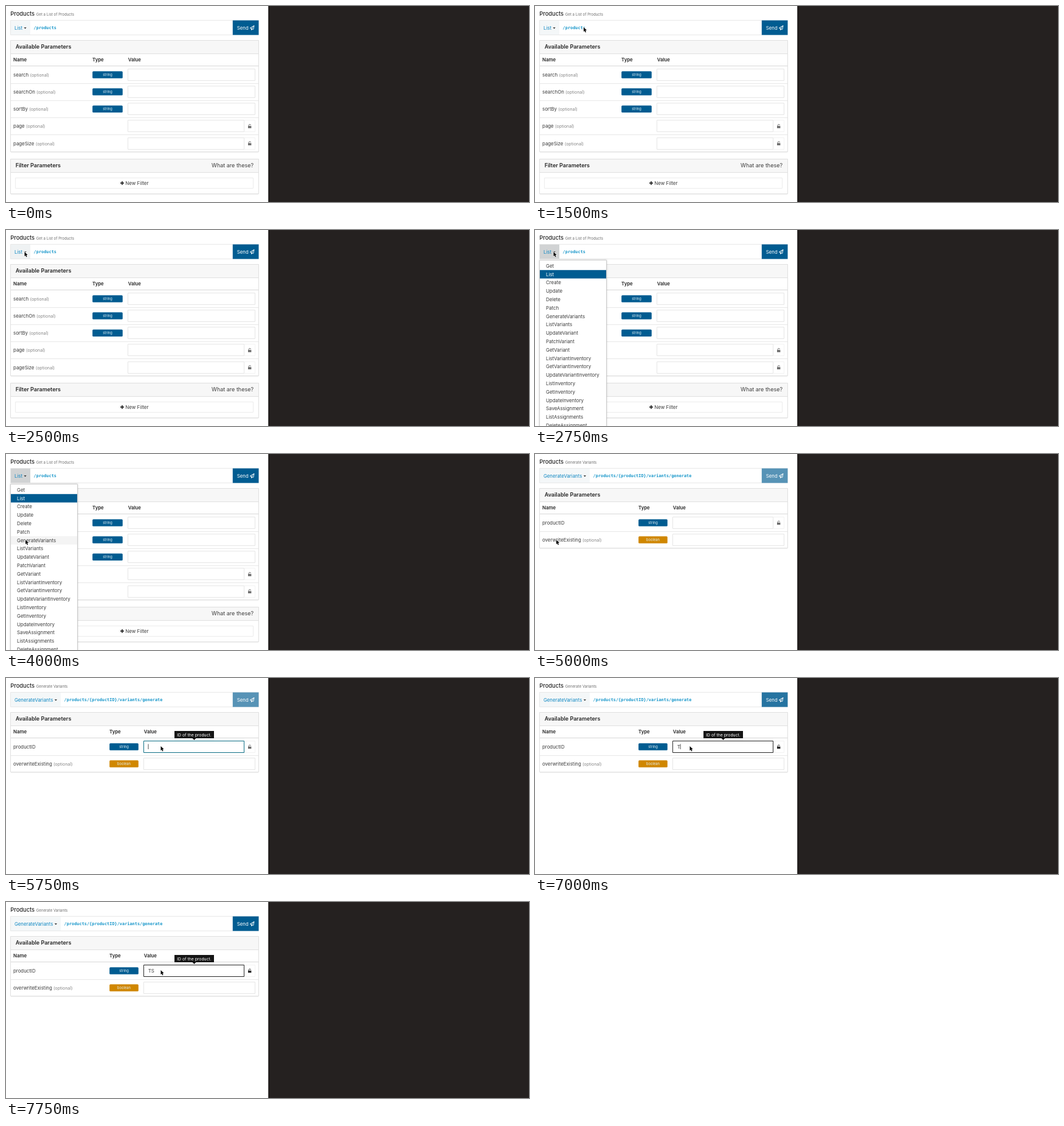
Recreate the animation shown at these times as an HTML page with a canvas. Size 860 by 322 pixels, loop 8 s.

```html
<!DOCTYPE html>
<html lang="en">
<head>
<meta charset="utf-8">
<title>API console</title>
<style>
  html, body { margin: 0; width: 100%; height: 100%; overflow: hidden; background: #fff; }
  canvas { display: block; width: 860px; height: 322px; }
</style>
</head>
<body>
<canvas id="stage" width="860" height="322"></canvas>
<script>
const ctx = document.getElementById('stage').getContext('2d');
const LOOP = 8000, STEP = 250;
const SANS = 'Inter, "Open Sans", sans-serif';
const MONO = '"DejaVu Sans Mono", monospace';
const INK = '#3c3c3c', DARK = '#262626', GREY = '#858585', LINE = '#e0e0e0', FIELD = '#e6e6e6';
const BLUE = '#005c91', LINK = '#1088c3', AMBER = '#d08700';
const MENU = ['Get', 'List', 'Create', 'Update', 'Delete', 'Patch', 'GenerateVariants',
  'ListVariants', 'UpdateVariant', 'PatchVariant', 'GetVariant', 'ListVariantInventory',
  'GetVariantInventory', 'UpdateVariantInventory', 'ListInventory', 'GetInventory',
  'UpdateInventory', 'SaveAssignment', 'ListAssignments', 'DeleteAssignment'];
const ROW = 28.15, ITEM = 13.81;

// Pointer keys: step, x, y
const PATH = [[5, 156, 12], [6, 80, 35], [7, 42, 39], [8, 30.5, 36], [11, 30.5, 36],
  [13, 31, 88], [15, 32, 136], [16, 32, 141], [19, 32, 141], [20, 35, 141],
  [21, 150, 126], [22, 240, 114], [23, 254.5, 112], [32, 254.5, 112]];

function pointerAt(n) {
  const i = PATH.findIndex(k => k[0] > n);
  if (i < 1) return null;
  const [a, ax, ay] = PATH[i - 1], [b, bx, by] = PATH[i];
  const p = (n - a) / (b - a);
  return { x: ax + (bx - ax) * p, y: ay + (by - ay) * p };
}

function fill(x, y, w, h, color) {
  ctx.fillStyle = color;
  ctx.fillRect(x, y, w, h);
}

function frame(x, y, w, h, color = LINE) {
  ctx.strokeStyle = color;
  ctx.lineWidth = 1;
  ctx.strokeRect(x + .5, y + .5, w - 1, h - 1);
}

function text(s, x, y, size = 7.8, color = INK, weight = 400, align = 'left', font = SANS) {
  ctx.font = `${weight} ${size}px ${font}`;
  ctx.textAlign = align;
  ctx.fillStyle = color;
  ctx.fillText(s, x, y);
  return ctx.measureText(s).width;
}

function poly(points, color) {
  ctx.beginPath();
  points.forEach(([x, y]) => ctx.lineTo(x, y));
  ctx.closePath();
  ctx.fillStyle = color;
  ctx.fill();
}

function badge(x, y, w, label, color) {
  ctx.fillStyle = color;
  ctx.beginPath();
  ctx.roundRect(x + .2, y - 5.8, w - .4, 11.5, 1.5);
  ctx.fill();
  text(label, x + w / 2, y + 2, 5.8, '#e4eef4', 400, 'center');
}

function lock(y, color) {
  fill(398, y - .3, 5.4, 3.5, color);
  ctx.strokeStyle = color;
  ctx.lineWidth = .9;
  ctx.beginPath();
  ctx.moveTo(399.2, y);
  ctx.lineTo(399.2, y - 1.4);
  ctx.arc(400.8, y - 1.4, 1.6, Math.PI, 0);
  ctx.stroke();
}

function plane() {
  ctx.strokeStyle = '#fff';
  ctx.lineWidth = .9;
  ctx.lineJoin = 'round';
  ctx.beginPath();
  [[408, 32.2], [401.2, 36.2], [403.4, 37.3], [406.8, 38.4]].forEach(p => ctx.lineTo(...p));
  ctx.closePath();
  ctx.moveTo(408, 32.2);
  ctx.lineTo(403.4, 37.3);
  ctx.lineTo(403.6, 39.6);
  ctx.lineTo(405, 37.9);
  ctx.stroke();
}

function panel(y, h, title) {
  fill(8, y + h, 407, 1, '#f2f2f2');
  fill(7, y, 409, 22, '#f7f7f7');
  frame(7, y, 409, h);
  fill(8, y + 22, 407, 1, LINE);
  text(title, 15.7, y + 14.2, 9, DARK, 600);
}

function topBar(op, note, path, split, shade, alpha) {
  text('Products', 7.3, 16.4, 9.3, DARK, 500);
  text(note, 49.8, 16.1, 6.1, '#6c6c6c');
  frame(7, 23, 409, 25, '#e8e8e8');
  fill(8, 24, split - 8, 23, shade);
  const x = 14 + text(op, 14, 38.8, 7.8, LINK) + 2.5;
  poly([[x, 35.2], [x + 4.2, 35.2], [x + 2.1, 37.5]], DARK);
  text(path, split + 5.6, 38.2, 6.9, '#1b98cb', 700, 'left', MONO);
  fill(372.8, 23.6, 42.7, 24, '#fff');
  ctx.globalAlpha = alpha;
  fill(372.8, 23.6, 42.7, 24, BLUE);
  ctx.globalAlpha = 1;
  text('Send', 379.8, 38.8, 7.8, '#fff');
  plane();
}

// Rows: name, optional, type, locked
function table(rows, typeX, typeW, valueX, lockColor) {
  text('Name', 12, 91.4, 7.8, DARK, 600);
  text('Type', typeX, 91.4, 7.8, DARK, 600);
  text('Value', valueX + .7, 91.4, 7.8, DARK, 600);
  fill(8, 98, 407, 1, '#d8d8d8');
  rows.forEach(([name, optional, type, locked], i) => {
    const y = 113 + i * ROW, top = Math.round(y - 10);
    if (i) fill(8, Math.round(y - 14.5), 407, 1, '#e8e8e8');
    const w = text(name, 12, y + 2.9, 7.85);
    if (optional) text('(optional)', 14.3 + w, y + 2.9, 7, GREY);
    if (type) badge(typeX, y, typeW, type, type === 'string' ? BLUE : AMBER);
    if (locked) {
      frame(391, top, 19, 20, '#f2f2f2');
      lock(y, lockColor);
    }
    frame(valueX, top, (locked ? 392 : 410) - valueX, 20, FIELD);
  });
}

function listPage(n) {
  const open = n >= 11 && n <= 16;
  const shade = open ? '#d1d3d4' : n === 10 ? '#eff2f3' : '#f4f7f8';
  topBar('List', 'Get a List of Products', '/products', 40, shade, n === 17 ? .87 : 1);
  panel(56, 184, 'Available Parameters');
  table([['search', 1, 'string'], ['searchOn', 1, 'string'], ['sortBy', 1, 'string'],
    ['page', 1, '', 1], ['pageSize', 1, '', 1]], 142, 50, 200, '#6a6a6a');
  panel(251, 58, 'Filter Parameters');
  text('What are these?', 407, 265.2, 9, INK, 400, 'right');
  frame(15, 282, 392, 18, '#ececec');
  fill(188, 290, 6, 1.7, DARK);
  fill(190.15, 287.9, 1.7, 6, DARK);
  text('New Filter', 196.2, 293.9, 8);
  if (n === 17) ['#bfdce8', '#b0d3e1', '#bddae4'].forEach((c, i) => fill(194.5 + i * 12.2, 31.5, 8.5, 8.5, c));
}

function menu(pointer) {
  ctx.save();
  ctx.shadowColor = 'rgba(0,0,0,.18)';
  ctx.shadowBlur = 3;
  fill(7, 49, 111, 290, '#fff');
  ctx.restore();
  frame(7, 49, 111, 290, '#ccc');
  MENU.forEach((name, i) => {
    const y = 58.9 + i * ITEM, top = y - ITEM / 2;
    const on = i === 1, hover = pointer.y >= top && pointer.y < top + ITEM;
    if (on || hover) fill(8, top, 109, ITEM, on ? BLUE : '#f4f4f4');
    text(name, 18, y + 2.8, 7.9, on ? '#fff' : INK);
  });
}

function tooltip() {
  fill(277, 87, 65, 12, '#151515');
  poly([[306.5, 99], [312.5, 99], [309.5, 102]], '#151515');
  text('ID of the product.', 309.5, 95.5, 6.85, '#fff', 400, 'center');
}

function variantPage(n) {
  const typed = n >= 28;
  const alpha = n === 18 ? .72 : n < 28 ? .66 : n === 28 ? .85 : 1;
  topBar('GenerateVariants', 'Generate Variants', '/products/{productID}/variants/generate',
    90, '#f4f7f8', alpha);
  panel(56, 99, 'Available Parameters');
  table([['productID', 0, 'string', 1], ['overwriteExisting', 1, 'boolean']],
    170, 48, 226, typed ? DARK : '#6a6a6a');
  if (n < 23) return;
  frame(226, 103, 166, 20, typed ? '#2a2a2a' : '#0f7086');
  tooltip();
  const w = text('TS'.slice(0, Math.max(0, n - 27)), 233.7, 115.8, 7.9);
  const caret = typed ? n < 31 : n < 25 || n === 27;
  if (caret) fill(233.6 + w, 108.5, .8, 8.5, DARK);
}

function arrow({ x, y }) {
  ctx.beginPath();
  [[0, 0], [0, 7.2], [1.6, 5.7], [2.8, 8.4], [4.1, 7.8], [2.9, 5.2], [5.1, 5.1]]
    .forEach(([dx, dy]) => ctx.lineTo(x + dx, y + dy));
  ctx.closePath();
  ctx.strokeStyle = '#fff';
  ctx.lineWidth = 1.2;
  ctx.stroke();
  ctx.fillStyle = '#000';
  ctx.fill();
}

function draw(now) {
  const n = Math.floor((now % LOOP) / STEP);
  const pointer = pointerAt(n);
  fill(0, 0, 860, 322, '#fff');
  if (n < 18) listPage(n);
  else variantPage(n);
  if (n >= 11 && n <= 16) menu(pointer);
  fill(431.5, 0, 428.5, 322, '#252120');
  fill(431.5, 0, 2, 322, '#1c1918');
  if (pointer) arrow(pointer);
}

const start = performance.now();
function tick() {
  draw(performance.now() - start);
  requestAnimationFrame(tick);
}
tick();
</script>
</body>
</html>
```
